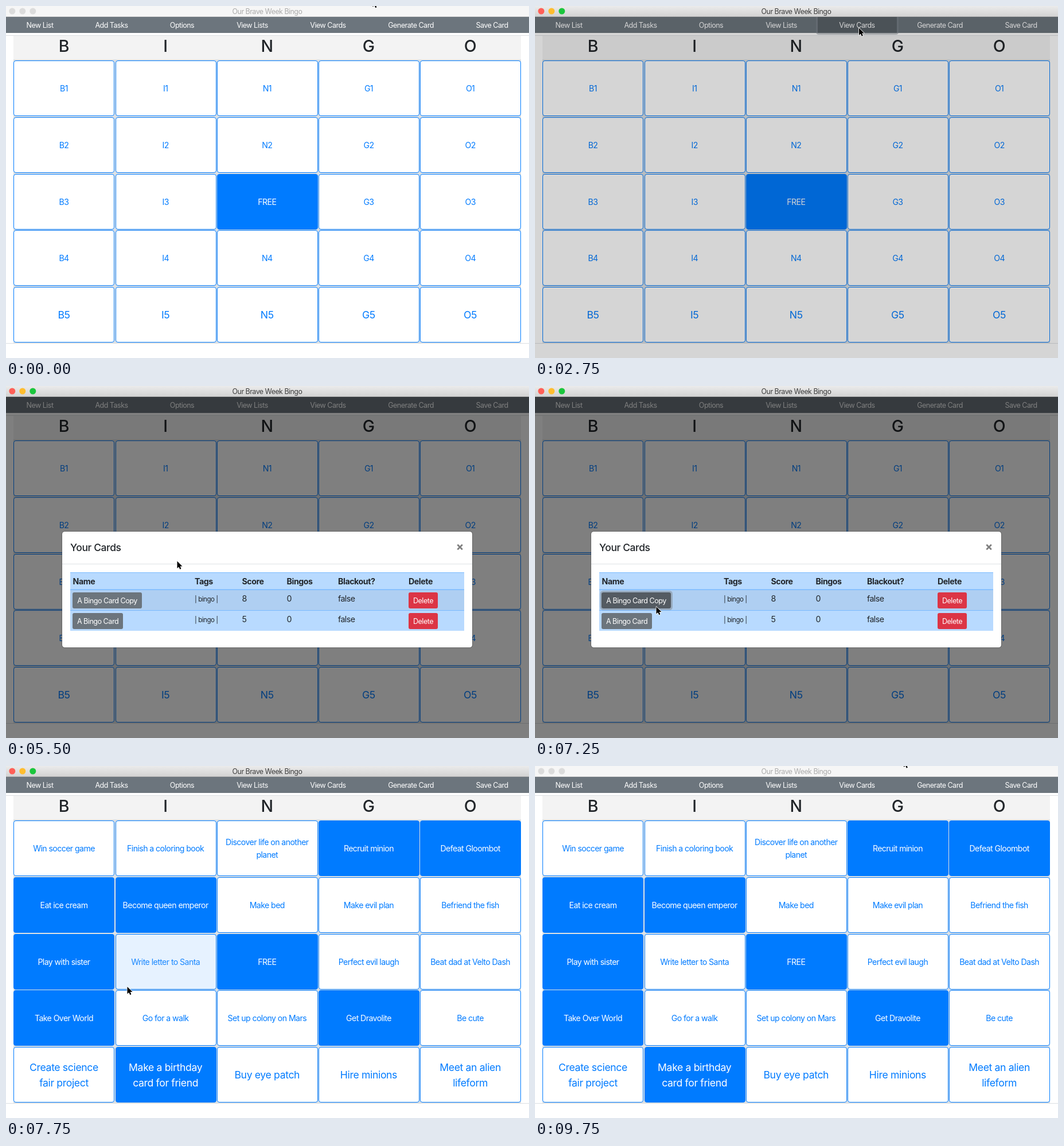
Animation, 912 px wide and 614 px high, one loop 10 s. Source, as an HTML page with a canvas:

```html
<!DOCTYPE html>
<html lang="en">
<head>
<meta charset="utf-8">
<title>Our Brave Week Bingo</title>
<style>
  html, body { margin: 0; width: 100%; height: 100%; overflow: hidden; background: #fff; }
  canvas { display: block; width: 912px; height: 614px; }
</style>
</head>
<body>
<canvas id="stage" width="912" height="614"></canvas>
<script>
const W = 912, H = 614, LOOP = 10000, STEP = 250;
const BLUE = '#007bff', GRAY = '#6c757d', INK = '#212529';
const screen = document.getElementById('stage').getContext('2d');
const layer = document.createElement('canvas');
layer.width = W;
layer.height = H;
const sheet = layer.getContext('2d');
let g = screen;

const NAV = [['New List', 59], ['Add Tasks', 184], ['Options', 307], ['View Lists', 429.5],
  ['View Cards', 561.5], ['Generate Card', 706], ['Save Card', 847.5]];
const VIEW = { x: 493, y: 19, w: 138, h: 28 };

// A leading "*" marks a completed task.
const TASKS = [
  ['Win soccer game', 'Finish a coloring book', 'Discover life on another|planet', '*Recruit minion', '*Defeat Gloombot'],
  ['*Eat ice cream', '*Become queen emperor', 'Make bed', 'Make evil plan', 'Befriend the fish'],
  ['*Play with sister', 'Write letter to Santa', 'FREE', 'Perfect evil laugh', 'Beat dad at Velto Dash'],
  ['*Take Over World', 'Go for a walk', 'Set up colony on Mars', '*Get Dravolite', 'Be cute'],
  ['Create science|fair project', '*Make a birthday|card for friend', 'Buy eye patch', 'Hire minions', 'Meet an alien|lifeform']
];

// Pointer stops: time, x, y
const PATH = [[0, 639.5, -11], [250, 639.5, -11], [1500, 565, 38.5], [3750, 565, 38.5],
  [5000, 332, 261], [5500, 298.5, 305.5], [6250, 211.5, 385], [8500, 211.5, 385],
  [9750, 643, -10.5], [10000, 643, -10.5]];

const clamp = v => Math.max(0, Math.min(1, v));
const ramp = (t, from, len) => clamp((t - from) / len);
const easeOut = p => 1 - Math.pow(1 - p, 1.8);

function mix(a, b, p) {
  return 'rgb(' + a.map((v, i) => Math.round(v + (b[i] - v) * p)).join(',') + ')';
}

function pointer(t) {
  const i = PATH.findIndex(p => p[0] > t);
  const a = PATH[i - 1], b = PATH[i];
  const p = (t - a[0]) / (b[0] - a[0]);
  return { x: a[1] + (b[1] - a[1]) * p, y: a[2] + (b[2] - a[2]) * p };
}

const inside = (p, b) => p.x >= b.x && p.x < b.x + b.w && p.y >= b.y && p.y < b.y + b.h;

function rect(x, y, w, h, color) {
  g.fillStyle = color;
  g.fillRect(x, y, w, h);
}

function round(x, y, w, h, r, fill, stroke, line = 1) {
  g.beginPath();
  g.roundRect(x, y, w, h, r);
  if (fill) { g.fillStyle = fill; g.fill(); }
  if (stroke) { g.strokeStyle = stroke; g.lineWidth = line; g.stroke(); }
}

function text(str, x, y, size, color, { weight = 400, align = 'left', track = -0.04 } = {}) {
  g.font = `${weight} ${size}px Inter, "Open Sans", sans-serif`;
  g.letterSpacing = (track * size).toFixed(3) + 'px';
  g.textAlign = align;
  g.fillStyle = color;
  g.fillText(str, x, y);
}

function titleBar(active) {
  const fill = g.createLinearGradient(0, 0, 0, 18);
  fill.addColorStop(0, active ? '#ebebeb' : '#f6f6f6');
  fill.addColorStop(1, active ? '#d3d3d3' : '#f6f6f6');
  rect(0, 0, W, 19, fill);
  rect(0, 18, W, 1, active ? '#b4b4b4' : '#d8d8d8');
  ['#ff5f57', '#ffbd2e', '#1ac63c'].forEach((c, i) => {
    g.beginPath();
    g.arc(10.8 + 18 * i, 9, 5.5, 0, 7);
    g.fillStyle = active ? c : '#dcdcdc';
    g.fill();
  });
  text('Our Brave Week Bingo', 455.5, 13.7, 12.4, active ? '#3d3d3d' : '#ababab', { align: 'center' });
}

function navBar(t, hover) {
  rect(0, 19, W, 28, GRAY);
  if (hover) {
    if (t >= 2000 && t < 3250) {
      round(VIEW.x - 1.5, VIEW.y - 1.5, VIEW.w + 3, VIEW.h + 3, 3, null, 'rgba(130,138,145,0.5)', 3);
    }
    rect(VIEW.x, VIEW.y, VIEW.w, VIEW.h, t === 2000 ? '#545b62' : '#5a6268');
  }
  for (const [label, x] of NAV) text(label, x, 37.7, 12.5, '#fff', { align: 'center' });
}

function tileBox(c, r) {
  return { x: Math.round(13.4 + 177.2 * c), y: Math.round(95.1 + 98.75 * r), w: 176, h: 97 };
}

function tileFill(t, c, r, loaded, pos) {
  if (c === 2 && r === 2) return 1;
  if (!loaded) return 0;
  if (TASKS[r][c][0] === '*') return t === 7500 ? 0.25 : 1;
  if (t >= 7750 && inside(pos, tileBox(c, r))) return t === 7750 ? 0.1 : 1;
  return 0;
}

function board(t, pos) {
  const loaded = t >= 7500;
  rect(0, 51, W, 1, '#dcdfe2');
  rect(0, 588, W, 1, '#dcdfe2');
  rect(13, 52, 885, 42, '#f3f3f3');
  rect(13, 93, 885, 495, '#dfe2e4');
  [...'BINGO'].forEach((ch, c) => {
    const mid = 101 + 177.15 * c;
    text(ch, mid, 80.2, 28.5, INK, { weight: 500, align: 'center', track: 0 });
    for (let r = 0; r < 5; r++) {
      const b = tileBox(c, r), p = tileFill(t, c, r, loaded, pos);
      round(b.x + 0.5, b.y + 0.5, b.w - 1, b.h - 1, 3.5, mix([255, 255, 255], [0, 123, 255], p), BLUE);
      const free = c === 2 && r === 2;
      const label = loaded || free ? TASKS[r][c].replace('*', '') : ch + (r + 1);
      const big = r === 4, size = big ? 17.6 : 14.1, gap = big ? 27 : 22;
      const lines = label.split('|');
      const color = mix([0, 123, 255], [255, 255, 255], p);
      lines.forEach((line, i) => {
        const y = 144 + 98.7 * r + (i - (lines.length - 1) / 2) * gap + size * 0.364;
        text(line, mid, y, size, color, { align: 'center', track: big ? -0.02 : -0.04 });
      });
    }
  });
}

function button(label, x, y, w, color) {
  round(x, y, w, 28, 3, color);
  text(label, x + w / 2, y + 18.8, 12.6, '#fff', { align: 'center' });
}

function dialog(t, pos) {
  round(98, 254, 715, 202, 4.5, '#fff');
  round(97.5, 253.5, 716, 203, 4.5, null, 'rgba(0,0,0,0.2)');
  text('Your Cards', 112, 288.3, 17.4, INK, { weight: 500, track: -0.02 });
  rect(98, 310, 715, 1, '#dee2e6');
  g.strokeStyle = '#7f7f7f';
  g.lineWidth = 2.7;
  g.beginPath();
  g.moveTo(787.3, 276.8); g.lineTo(795.8, 285.3);
  g.moveTo(795.8, 276.8); g.lineTo(787.3, 285.3);
  g.stroke();

  rect(112, 325, 687, 102, '#b8daff');
  rect(112, 356, 687, 35, '#afcff2');
  rect(112, 325, 687, 1, '#7abaff');
  rect(112, 354.5, 687, 1.5, '#7abaff');
  rect(112, 391, 687, 1, '#7abaff');
  const cols = [116.5, 329, 411.5, 489.5, 579, 702];
  ['Name', 'Tags', 'Score', 'Bingos', 'Blackout?', 'Delete'].forEach((head, i) =>
    text(head, cols[i], 346, 14.2, INK, { weight: 700, track: -0.03 }));

  const over = t >= 5500 && inside(pos, { x: 116, y: 360, w: 121, h: 28 });
  const pressed = t >= 7250;
  if (pressed) round(115, 358.5, 123.5, 31, 4, null, 'rgba(130,138,145,0.5)', 3);
  [['A Bingo Card Copy', 121, '8'], ['A Bingo Card', 88, '5']].forEach(([name, w, score], i) => {
    const y = 360 + 36 * i;
    const color = i ? GRAY : pressed ? '#545b62' : over ? '#5a6268' : GRAY;
    button(name, 116, y, w, color);
    text('| bingo |', cols[1], y + 16.2, 11.5, INK);
    text(score, cols[2], y + 16.3, 14.2, INK);
    text('0', cols[3], y + 16.3, 14.2, INK);
    text('false', cols[4], y + 16.3, 14.2, INK);
    button('Delete', 702, y, 51, '#dc3545');
  });
}

function arrow({ x, y }) {
  const pts = [[0, 0], [0, 12.6], [2.9, 9.9], [4.8, 14.2], [6.9, 13.3], [5.1, 9.1], [9, 9]];
  g.beginPath();
  for (const [dx, dy] of pts) g.lineTo(x + dx, y + dy);
  g.closePath();
  g.lineJoin = 'round';
  g.lineWidth = 1.6;
  g.strokeStyle = '#fff';
  g.stroke();
  g.fillStyle = '#000';
  g.fill();
}

function draw(t) {
  const pos = pointer(t);
  g = screen;
  rect(0, 0, W, H, '#fff');
  board(t, pos);
  navBar(t, t < 4000 && inside(pos, VIEW));
  titleBar(t >= 1000 && t < 9750);

  const dim = t < 7750 ? 0.5 * ramp(t, 2700, 150) : 0;
  if (dim) rect(0, 19, W, H - 19, `rgba(0,0,0,${dim})`);

  const closing = t >= 7500;
  const alpha = closing ? (t === 7500 ? 0.47 : 0) : ramp(t, 2870, 150);
  if (alpha) {
    const lift = closing ? -15 : Math.round(-50 * (1 - easeOut(ramp(t, 2870, 300))));
    g = sheet;
    g.clearRect(0, 0, W, H);
    dialog(t, pos);
    g = screen;
    g.globalAlpha = alpha;
    g.drawImage(layer, 0, lift);
    g.globalAlpha = 1;
  }
  arrow(pos);
}

function tick() {
  const t = performance.now() % LOOP;
  draw(Math.floor(t / STEP) * STEP);
  requestAnimationFrame(tick);
}
tick();
</script>
</body>
</html>
```
